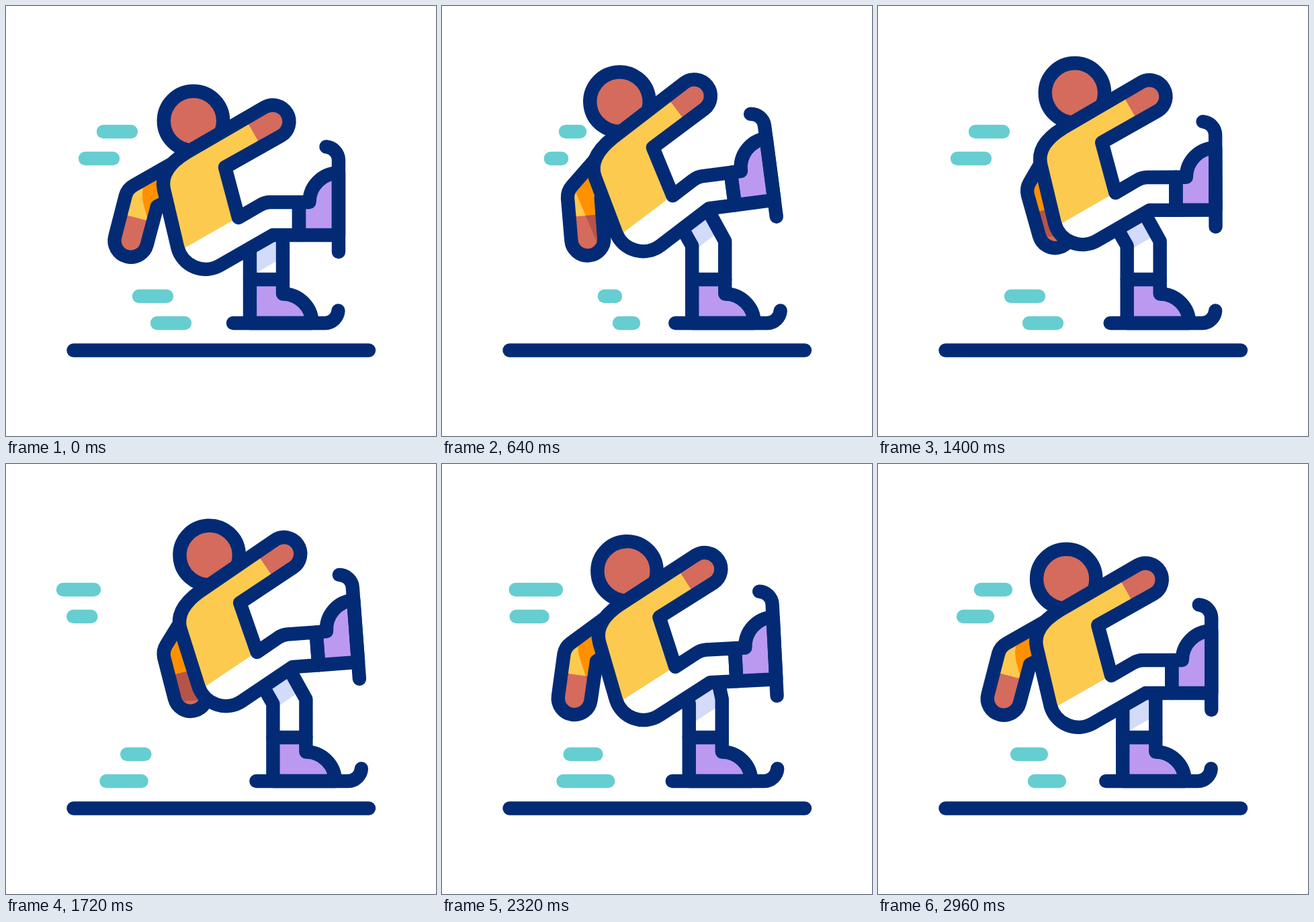
Recreate the animation shown at these times as an HTML page with a canvas. Size 640x640 px, loop 3 s.

```html
<!DOCTYPE html>
<html>
<head>
<meta charset="utf-8">
<style>
html, body { margin: 0; width: 100%; height: 100%; overflow: hidden; background: #fff; }
canvas { display: block; width: 640px; height: 640px; }
</style>
</head>
<body>
<canvas id="stage" width="640" height="640"></canvas>
<script>
const g = document.getElementById('stage').getContext('2d');
const LOOP = 3000;
const NAVY = '#032b75', SKIN = '#d46b5d', DARK_SKIN = '#b6544a', YELLOW = '#fdca50',
  ORANGE = '#ff9100', PURPLE = '#bb99f1', LAVENDER = '#d3dbfb', TEAL = '#66cdd1';

const P = d => new Path2D(d);
const shapes = {
  ground: P('M100.5 512.5H540'),
  torso: P('M326 240L346 315L378 296.500Q385.500 292 393 292H436V341H397L318.500 386' +
    'A43 43 0 0 1 255.500 360L235 273Q228 243 268 218.500L384.700 150.800' +
    'A24.500 24.500 0 0 1 409.300 193.200Z'),
  shirt: P('M200 397.500L346 314.500L450 140L200 100Z'),
  hand: P('M349 155L389 225L460 185L410 110Z'),
  backArm: P('M262 226L190 267Q181 272 178 282L162.300 343' +
    'A24.500 24.500 0 0 0 209.700 355.500L225 298L245 288'),
  backHand: P('M155 305L236 326L220 400L130 380Z'),
  shade: P('M209 255Q199 277 205 297L228 380H330V200H209Z'),
  thighShade: P('M340 416L440 358V250H340Z'),
  ski: P('M-25 0H112A20 20 0 0 0 131.500 -18.500')
};

// Left and right extents at rest, far left extent, start of the left end's
// move, its duration, and how far right the dash is born.
const dashes = [
  { y: 187, l: 135, r: 196, end: 58, from: 0, dur: 466, birth: 80 },
  { y: 227, l: 108, r: 169, end: 79, from: 80, dur: 420, birth: 90 },
  { y: 432, l: 188, r: 249, end: 159, from: 80, dur: 420, birth: 90 },
  { y: 472, l: 215, r: 276, end: 118, from: 0, dur: 466, birth: 80 }
];

const ease = (t, a, b) => {
  const u = Math.min(1, Math.max(0, (t - a) / (b - a)));
  return (1 - Math.cos(Math.PI * u)) / 2;
};
const mix = (a, b, u) => a + (b - a) * u;

function fill(path, color) {
  g.fillStyle = color;
  g.fill(path);
}
function stroke(path, color = NAVY) {
  g.strokeStyle = color;
  g.stroke(path);
}
function scoped(draw) {
  g.save();
  draw();
  g.restore();
}
function turn(x, y, degrees) {
  g.translate(x, y);
  g.rotate(degrees * Math.PI / 180);
  g.translate(-x, -y);
}

function drawDashes(t) {
  const start = Math.min(3, Math.floor(t / 700)) * 700;
  const last = start === 2100;
  const p = t - start, length = last ? 900 : 700, rise = last ? 190 : 120;
  const leaving = p < 540;
  if (!leaving && p < length - rise) return;
  const back = 1 - ease(p, length - rise, length);
  for (const d of dashes) {
    const l = leaving ? mix(d.l, d.end, ease(p, d.from, d.from + d.dur)) : d.l + d.birth * back;
    const r = leaving ? mix(d.r, d.end + 20, ease(p, 120, 540)) : d.r + 39 * back;
    stroke(P(`M${l + 10} ${d.y}H${Math.max(l + 10.1, r - 10)}`), TEAL);
  }
}

function drawFoot(x, y, degrees, strap) {
  scoped(() => {
    g.translate(x, y);
    g.rotate(degrees * Math.PI / 180);
    const boot = P(`M0 0V${-strap}H49V-43.500A43.500 43.500 0 0 1 92.500 0Z`);
    fill(boot, PURPLE);
    stroke(boot);
    stroke(shapes.ski);
  });
}

function drawBackArm(swing) {
  const swung = () => turn(264, 230, -swing);
  const unswung = () => turn(264, 230, swing);
  scoped(() => {
    swung();
    g.clip(shapes.backArm);
    fill(shapes.backArm, YELLOW);
    fill(shapes.backHand, SKIN);
    // the torso's shadow stays with the torso while the arm swings
    unswung();
    g.clip(shapes.shade);
    fill(shapes.shade, ORANGE);
    swung();
    fill(shapes.backHand, DARK_SKIN);
  });
  scoped(() => {
    swung();
    stroke(shapes.backArm);
  });
}

function drawStandingLeg(lift, toBody) {
  const left = `M${363 - 16 * lift} 329L363 357V407`;
  const right = `L412 350L${412 - 20 * lift} 314`;
  const leg = P(`${left}H412${right}Z`);
  scoped(() => {
    fill(leg, '#fff');
    g.clip(leg);
    toBody();
    fill(shapes.thighShade, LAVENDER);
  });
  stroke(P(`${left}M412 407${right}`));
  drawFoot(363, 472, 0, 65);
}

function drawBody(lift) {
  const head = new Path2D();
  head.arc(279 + 7 * lift, 171 - 5 * lift, 44.2, 0, 7);
  fill(head, SKIN);
  stroke(head);
  fill(shapes.torso, '#fff');
  scoped(() => {
    g.clip(shapes.torso);
    fill(shapes.shirt, YELLOW);
    fill(shapes.hand, SKIN);
  });
  drawFoot(495, 341, -90, 59);
  stroke(shapes.torso);
}

function draw(t) {
  const lift = ease(t, 60, 690) - ease(t, 2050, 2525);
  const lean = 7.5 * (ease(t, 60, 610) - ease(t, 610, 1330) + ease(t, 1330, 2050) - ease(t, 2050, 2525));
  const swing = 30 * (ease(t, 80, 1380) - ease(t, 1380, 2600));
  const beat = t % 750;
  const shift = 51 * (ease(beat, 0, 360) - ease(beat, 360, 750));
  const toBody = () => {
    turn(369, 371, -lean);
    g.translate(0, -37 * lift);
  };

  g.fillStyle = '#fff';
  g.fillRect(0, 0, 640, 640);
  g.lineWidth = 20.4;
  g.lineCap = g.lineJoin = 'round';
  stroke(shapes.ground);
  drawDashes(t);
  scoped(() => {
    g.translate(shift, 0);
    scoped(() => {
      toBody();
      drawBackArm(swing);
    });
    drawStandingLeg(lift, toBody);
    scoped(() => {
      toBody();
      drawBody(lift);
    });
  });
}

const began = performance.now();
function tick() {
  draw((performance.now() - began) % LOOP);
  requestAnimationFrame(tick);
}
tick();
</script>
</body>
</html>
```
